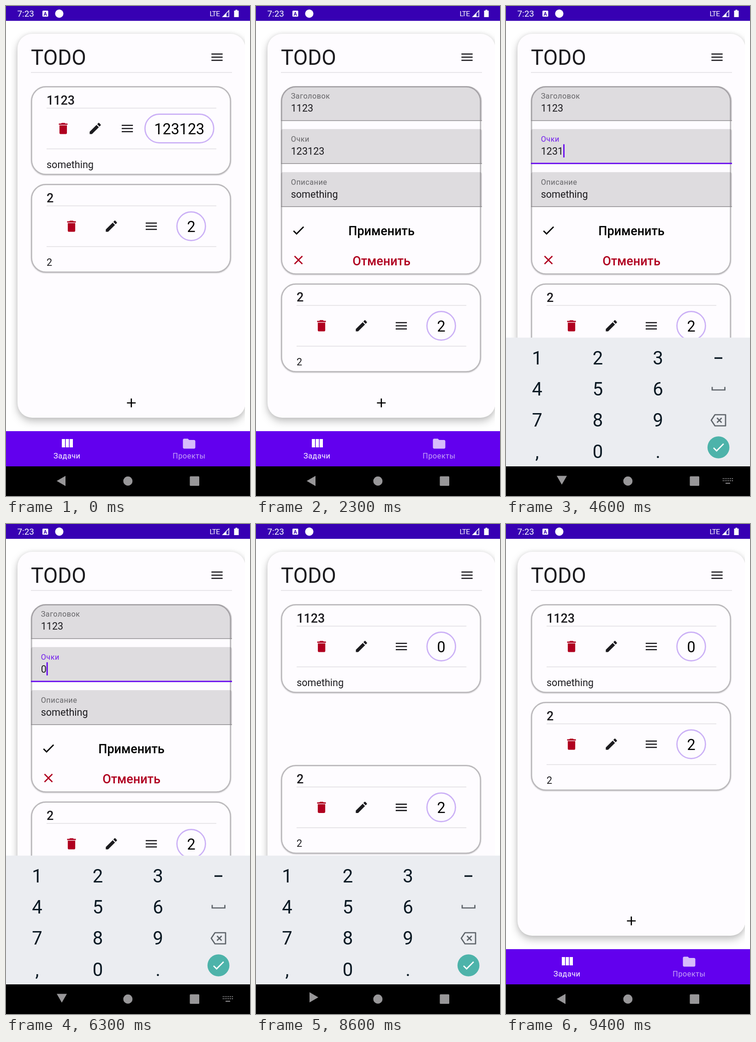
An HTML page that plays this animation: 529 px wide and 1058 px high, repeating every 9.5 s.

```html
<!DOCTYPE html>
<html lang="ru">
<head>
<meta charset="utf-8">
<title>TODO</title>
<style>
  html, body { margin: 0; width: 100%; height: 100%; overflow: hidden; background: #fff; }
  svg { display: block; width: 100vw; height: 100vh; font-family: Roboto, sans-serif; }
  text { white-space: pre; }
  .mid { text-anchor: middle; }
  .medium { font-weight: 500; font-size: 26.9px; }
  .body { font-size: 21.55px; }
  .caption { font-size: 16.2px; letter-spacing: .54px; }
  .panel { filter: drop-shadow(0 8px 9px rgba(0,0,0,.22)) drop-shadow(0 0 4px rgba(0,0,0,.1)); }
  .card { fill: #fefcff; stroke: #bbb9bc; stroke-width: 2.7px; filter: drop-shadow(0 1px 1px rgba(0,0,0,.18)); }
  .rule { stroke: #dfdde1; stroke-width: 1.4px; }
  .chip { fill: none; stroke: #cbb0f6; stroke-width: 2.7px; }
</style>
</head>
<body>
<svg id="stage" viewBox="0 0 529 1058" preserveAspectRatio="none" fill="#1c1b1f"></svg>
<script>
const LOOP = 9500, STEP = 100;
const CARD_W = 434, VIEW_H = 192, FORM_H = 407, GROWTH = FORM_H - VIEW_H;
const OPEN = 1684, FOCUS = 3750, APPLY = 8084, CLOSED = 8536;
const DELETIONS = [4300, 4600, 4700, 4800, 4900, 5000];
const INK = '#1c1b1f', RED = '#b00020', PURPLE = '#6200ee', GREY = '#989799';

const ICONS = {
  trash: 'M6 19c0 1.1.9 2 2 2h8c1.1 0 2-.9 2-2V7H6zM19 4h-3.5l-1-1h-5l-1 1H5v2h14z',
  pencil: 'M3 17.25V21h3.75L17.81 9.94l-3.75-3.75zM20.71 7.04c.39-.39.39-1.02 0-1.41l-2.34-2.34c-.39-.39-1.02-.39-1.41 0l-1.83 1.83 3.75 3.75z',
  menu: 'M3 18h18v-2H3zm0-5h18v-2H3zm0-7v2h18V6z',
  plus: 'M19 13h-6v6h-2v-6H5v-2h6V5h2v6h6z',
  check: 'M9 16.17 4.83 12l-1.42 1.41L9 19 21 7l-1.41-1.41z',
  cross: 'M19 6.41 17.59 5 12 10.59 6.41 5 5 6.41 10.59 12 5 17.59 6.41 19 12 13.41 17.59 19 19 17.59 13.41 12z',
  folder: 'M10 4H4c-1.1 0-2 .9-2 2v12c0 1.1.9 2 2 2h16c1.1 0 2-.9 2-2V8c0-1.1-.9-2-2-2h-8z'
};

const icon = (name, x, y, fill = INK, scale = 1.347, attrs = '') =>
  `<path ${attrs} d="${ICONS[name]}" fill="${fill}" transform="translate(${x} ${y}) scale(${scale}) translate(-12 -12)"/>`;
const text = (str, x, y, cls, attrs = '') => `<text x="${x}" y="${y}" class="${cls}" ${attrs}>${str}</text>`;
const rect = (x, y, w, h, fill, attrs = '') => `<rect x="${x}" y="${y}" width="${w}" height="${h}" fill="${fill}" ${attrs}/>`;
const rule = (x1, x2, y) => `<path class="rule" d="M${x1} ${y}H${x2}"/>`;

// Card contents are laid out relative to the top of the card.
function actions(value, wide) {
  const [trash, pencil, menu] = wide ? [124, 193.5, 263] : [142, 228.5, 315];
  const [left, width] = wide ? [301.3, 149] : [370.6, 61.8];
  return icon('trash', trash, 91.5, RED) + icon('pencil', pencil, 91.5) + icon('menu', menu, 91.5) +
    `<rect class="chip" x="${left}" y="60.6" width="${width}" height="61.8" rx="30.9"/>` +
    text(value, left + width / 2, 104, 'mid', 'font-size="32.3" fill="#000"');
}

const summary = (title, note, body) =>
  text(title, 88, 39.5, 'medium') + rule(88, 456, 47.5) + body + rule(88, 456, 135.5) + text(note, 88, 177, 'body');

const frame = (id, height) =>
  `<rect id="${id}" class="card" x="55.4" y="1.4" width="431.3" height="${height - 2.8}" rx="31"/>`;

function field(label, value, y, id = '') {
  return `<path d="M54 ${y + 75}v-70q0-5 5-5h426q5 0 5 5v70z" fill="${INK}" fill-opacity=".14"/>` +
    text(label, 75.7, y + 27, 'caption', `id="${id}Label" fill-opacity=".62"`) +
    text(value, 75.7, y + 55, 'body', `id="${id}Value"`) +
    rect(54, y + 73.8, 436, 1.4, '#8a888b', `id="${id}Line"`);
}

const form =
  field('Заголовок', '1123', 0, 'title') + field('Очки', '123123', 92.8, 'score') + field('Описание', 'something', 185.8, 'note') +
  rect(0, 125.5, 2.7, 28.5, PURPLE, 'id="caret"') +
  rect(54, 279, 436, 64.5, INK, 'id="pressed" fill-opacity=".1"') +
  icon('check', 92, 311.5, '#000') + text('Применить', 272, 321.5, 'mid medium', 'fill="#000"') +
  icon('cross', 92, 375.5, RED) + text('Отменить', 272, 386.5, 'mid medium', `fill="${RED}"`);

const statusBar =
  rect(0, 0, 529, 32, '#3700b3') +
  `<g fill="#fff">` + text('7:23', 24.5, 23, '', 'font-size="18.9"') +
  rect(79, 10, 12.5, 13, '#fff', 'rx="1.5"') +
  text('A', 85.2, 20.5, 'mid', 'font-size="11" font-weight="700" fill="#3700b3"') +
  `<circle cx="115.5" cy="16.5" r="9"/>` +
  text('LTE', 441.5, 21.5, '', 'font-size="15.5" letter-spacing="-.9"') +
  `<path d="M470 23.2 483.2 10V23.2z" fill="none" stroke="#fff" stroke-width="1.6"/><path d="M470 23.2 478 15.2V23.2z"/>
   <path d="M497.5 8h4v2h3v14h-10V10h3z"/></g>`;

const tabs =
  rect(0, 918, 529, 76, PURPLE) +
  [121, 129.5, 138].map(x => rect(x, 935, 7, 18, '#fff')).join('') +
  text('Задачи', 132.3, 977, 'mid caption', 'fill="#fff"') +
  icon('folder', 397, 945, '#d7bcfb') +
  text('Проекты', 397, 977, 'mid caption', 'fill="#c7a3f8"');

const systemBar =
  rect(0, 994, 529, 64, '#000') +
  `<g fill="${GREY}"><path id="back" d="M110 1025.5l19-11v22z"/>
   <circle cx="264.3" cy="1025.7" r="10"/>` + rect(398.5, 1015.5, 20.5, 20.5, GREY, 'rx="1.5"') +
  `<g id="keysIcon" fill="none" stroke="${GREY}" stroke-width="2">
   <path d="M470 1020.5h22M470 1025h22" stroke-dasharray="2 2"/><path d="M476 1030.5h10"/></g></g>`;

const digit = (str, col, row) => text(str, [67.5, 199, 329.5][col], 774 + row * 67.2, 'mid');
const keyboard =
  rect(0, 716, 529, 280, '#ebedf1') +
  `<g font-size="40" fill="#0b1a24">` +
  ['123', '456', '789', ',0.'].map((keys, row) => [...keys].map((key, col) => digit(key, col, row)).join('')).join('') +
  `</g>` + rect(452, 758.5, 17, 3.4, '#0b1a24') +
  `<g fill="none" stroke="#5f656b" stroke-width="2.7">
   <path d="M447 822.5v6.5h27.5v-6.5"/>
   <path d="M453 882.5h23v24h-23l-8-12zM457.5 889.5l10 10m0-10l-10 10" stroke-linejoin="round"/></g>
   <circle cx="460.6" cy="953" r="23.8" fill="#4db3aa"/>` + icon('check', 460.6, 953, '#fff');

document.getElementById('stage').innerHTML = `
  <defs>
    <clipPath id="page"><rect x="11" y="32" width="507" height="886"/></clipPath>
    <clipPath id="cardClip"><rect id="clipRect" x="54" width="${CARD_W + 2}" rx="32"/></clipPath>
    <clipPath id="aboveBar"><rect width="529" height="994"/></clipPath>
  </defs>
  ${rect(0, 0, 529, 1058, '#fff')}
  <g clip-path="url(#page)">${rect(25, 60, 494, 829, '#fefcff', 'rx="32" class="panel"')}</g>
  ${text('TODO', 54, 127, '', 'font-size="45.8"')}
  ${icon('menu', 457.5, 110.5)}${rule(54, 490, 143.5)}
  ${icon('plus', 271.7, 857, '#000')}
  <g id="second">${frame('secondFrame', VIEW_H)}${summary('2', '2', actions('2', false))}</g>
  <g transform="translate(0 173)">
    ${frame('firstFrame', VIEW_H)}
    <g clip-path="url(#cardClip)">
      <g id="view">
        <circle id="ripple" cx="193.5" cy="91.5" r="25.5" fill="${INK}"/>
        ${summary('1123', 'something', `<g id="wide">${actions('123123', true)}</g><g id="narrow">${actions('0', false)}</g>`)}
      </g>
      <g id="form">${form}</g>
    </g>
  </g>
  ${statusBar}${tabs}
  <g clip-path="url(#aboveBar)"><g id="keyboard">${keyboard}</g></g>
  ${systemBar}`;

const el = {};
document.querySelectorAll('[id]').forEach(node => el[node.id] = node);
const set = (id, attrs) => { for (const key in attrs) el[id].setAttribute(key, attrs[key]); };
const show = (id, on) => set(id, { visibility: on ? 'visible' : 'hidden' });
const shift = (id, x, y) => set(id, { transform: `translate(${x} ${y})` });

const ramp = (t, from, to) => Math.min(1, Math.max(0, (t - from) / (to - from)));
const ease = p => p * p * (3 - 2 * p);
// Critically damped spring going from 0 to 1.
const spring = (t, start) => {
  const x = Math.max(0, t - start) * .02;
  return 1 - (1 + x) * Math.exp(-x);
};

function draw(t) {
  const expanded = t >= OPEN && t < CLOSED;
  const opening = spring(t, OPEN), closing = spring(t, APPLY);
  const height = expanded ? FORM_H : VIEW_H;
  set('firstFrame', { height: height - 2.8 });
  set('clipRect', { height });
  shift('second', 0, 384 + GROWTH * (opening - spring(t, CLOSED)));

  shift('view', t < APPLY ? -CARD_W * opening : CARD_W * (1 - closing), 0);
  shift('form', t < APPLY ? CARD_W * (1 - opening) : -CARD_W * closing, 0);
  show('form', expanded);
  show('wide', t < APPLY);
  show('narrow', t >= APPLY);

  set('ripple', {
    r: 12 + 13.5 * ramp(t, 1420, 1600),
    'fill-opacity': .14 * ramp(t, 1420, 1520) * (1 - ramp(t, 1650, 1850))
  });
  show('pressed', t >= 8000 && t < CLOSED);

  const edits = DELETIONS.filter(time => t >= time);
  el.scoreValue.textContent = '123123'.slice(0, 6 - edits.length) || '0';
  const lastEdit = edits.length ? edits[edits.length - 1] : FOCUS;
  show('caret', t >= FOCUS && t < 8000 && (t - lastEdit) % 1000 < 500);
  set('caret', { x: 75.7 + el.scoreValue.getComputedTextLength() });

  const focused = t >= 3900;
  set('scoreLabel', { fill: focused ? PURPLE : INK, 'fill-opacity': focused ? .87 : .62 });
  set('scoreLine', focused ? { y: 165.6, height: 2.7, fill: PURPLE } : { y: 166.6, height: 1.4, fill: '#8a888b' });

  const raised = ease(ramp(t, 3820, 4000)) - ease(ramp(t, 8620, 8880));
  shift('keyboard', 0, 280 * (1 - raised));
  show('keyboard', raised > 0);
  show('keysIcon', t >= FOCUS && t < CLOSED);
  const turn = ramp(t, 3820, 4000) - ramp(t, 8540, 8720);
  set('back', { transform: `rotate(${-90 * turn} 119.5 1024)` });
}

function tick() {
  draw(Math.floor(performance.now() % LOOP / STEP) * STEP);
  requestAnimationFrame(tick);
}
tick();
</script>
</body>
</html>
```
